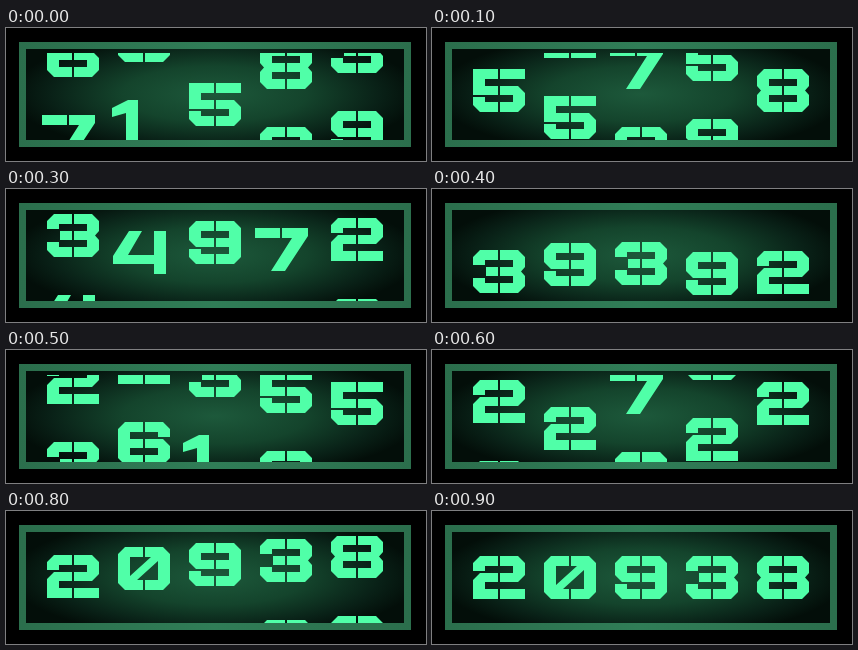
Animation, 420 px wide and 133 px high, one loop 1000 ms. Source, as an HTML page:

```html
<!DOCTYPE html>
<html lang="en">
<head>
<meta charset="utf-8">
<title>Rolling counter</title>
<style>
html, body { margin: 0; width: 100%; height: 100%; overflow: hidden; background: #000; }
svg { display: block; width: 100vw; height: 100vh; }
</style>
</head>
<body>
<svg viewBox="0 0 420 133">
  <defs>
    <radialGradient id="glow" gradientUnits="userSpaceOnUse" cx="0" cy="0" r="1"
      gradientTransform="translate(209 66) scale(205 62)">
      <stop offset="0" stop-color="#1d593b"/>
      <stop offset=".45" stop-color="#14442c"/>
      <stop offset=".8" stop-color="#092117"/>
      <stop offset="1" stop-color="#030e09"/>
    </radialGradient>
    <linearGradient id="rim">
      <stop offset="0" stop-color="#2b6e4c"/>
      <stop offset=".5" stop-color="#307d57"/>
      <stop offset="1" stop-color="#2b6e4c"/>
    </linearGradient>
    <clipPath id="window"><rect x="20" y="25" width="378" height="87"/></clipPath>
  </defs>
  <rect width="420" height="133" fill="#000"/>
  <rect x="13" y="14" width="392" height="105" fill="url(#rim)"/>
  <rect x="20" y="21" width="378" height="91" fill="url(#glow)"/>
  <g clip-path="url(#window)" fill="#50ffa8" id="reels"></g>
</svg>
<script>
const NS = 'http://www.w3.org/2000/svg';
const PITCH = 81, REST = 45, LEFT = 41, GAP = 71, STEP = 100, STEPS = 10;

// Stencil pieces in a 52 x 43 cell, split by a slit at x = 25..27
const hookTL = 'M25 0H7L0 7V15H12V10H25Z';
const hookBL = 'M25 43H7L0 36V28H12V33H25Z';
const hookTR = 'M27 0H45L52 7V15H40V10H27Z';
const sideL = 'M25 0H7L0 7V17L4 21.5L0 26V36L7 43H25V33H12V26H25V17H12V10H25Z';
const sideR = 'M27 0H45L52 7V17L48 21.5L52 26V36L45 43H27V33H40V26H27V17H40V10H27Z';
const bowlR = 'M27 17H45L52 24V36L45 43H27V33H40V26H27Z';
const bowlL = 'M25 26H7L0 19V7L7 0H25V10H12V17H25Z';

const glyphs = [
  'M25 0H7L0 7V36L7 43H25V33H19L40 14V33H27V43H45L52 36V7L45 0H27V10H33L12 29V10H25Z',
  'M10 0H20V43H8V13L-6 17V8Z',
  hookTL + 'M27 0H45L52 7V19L45 26H27V17H40V10H27ZM25 17V26H12V33H25V43H0V24L7 17ZM27 33H52V43H27Z',
  hookTL + hookBL + sideR + 'M13 17H25V26H13Z',
  'M11 0H24L10 24H36V0H48V43H36V33H-5V25Z',
  'M0 0H25V10H12V17H25V26H0ZM27 0H52V10H27Z' + bowlR + hookBL,
  'M25 0H7L0 7V36L7 43H25V33H12V26H25V17H12V10H25Z' + hookTR + bowlR,
  'M-5 0H20V10H-5ZM22 0H48V8L25 43H11L32 10H22Z',
  sideL + sideR,
  bowlL + hookBL + 'M27 0H45L52 7V36L45 43H27V33H40V26H27V17H40V10H27Z'
];

// strip: digits read upward from the resting one; left: distance still to roll at each step
const reels = [
  { strip: '234567', left: [363, 247, 166, 101, 65, 34, 15, 6, 1, 0] },
  { strip: '026964817253631', left: [1107, 787, 580, 408, 234, 135, 69, 29, 9, 0] },
  { strip: '973138092564107826435', left: [1610, 1161, 830, 580, 316, 203, 105, 43, 13, 0] },
  { strip: '3825619407382641907594820589', left: [2133, 1574, 1100, 735, 468, 268, 139, 57, 17, 0] },
  { strip: '86205312941296307514263089175246839', left: [2716, 1948, 1382, 907, 550, 337, 175, 72, 21, 0] }
];

const root = document.getElementById('reels');
const slots = reels.map(() => [0, 1].map(() => root.appendChild(document.createElementNS(NS, 'path'))));

function draw(step) {
  reels.forEach(({ strip, left }, col) => {
    const first = Math.ceil((left[step] - REST - 18) / PITCH);
    slots[col].forEach((path, i) => {
      const k = first + i;
      const y = REST - left[step] + PITCH * k;
      path.setAttribute('d', glyphs[strip[k]] || '');
      path.setAttribute('transform', `translate(${LEFT + GAP * col} ${y})`);
    });
  });
}

let shown = -1;
function tick() {
  const step = Math.floor(performance.now() / STEP) % STEPS;
  if (step !== shown) draw(shown = step);
  requestAnimationFrame(tick);
}
tick();
</script>
</body>
</html>
```
